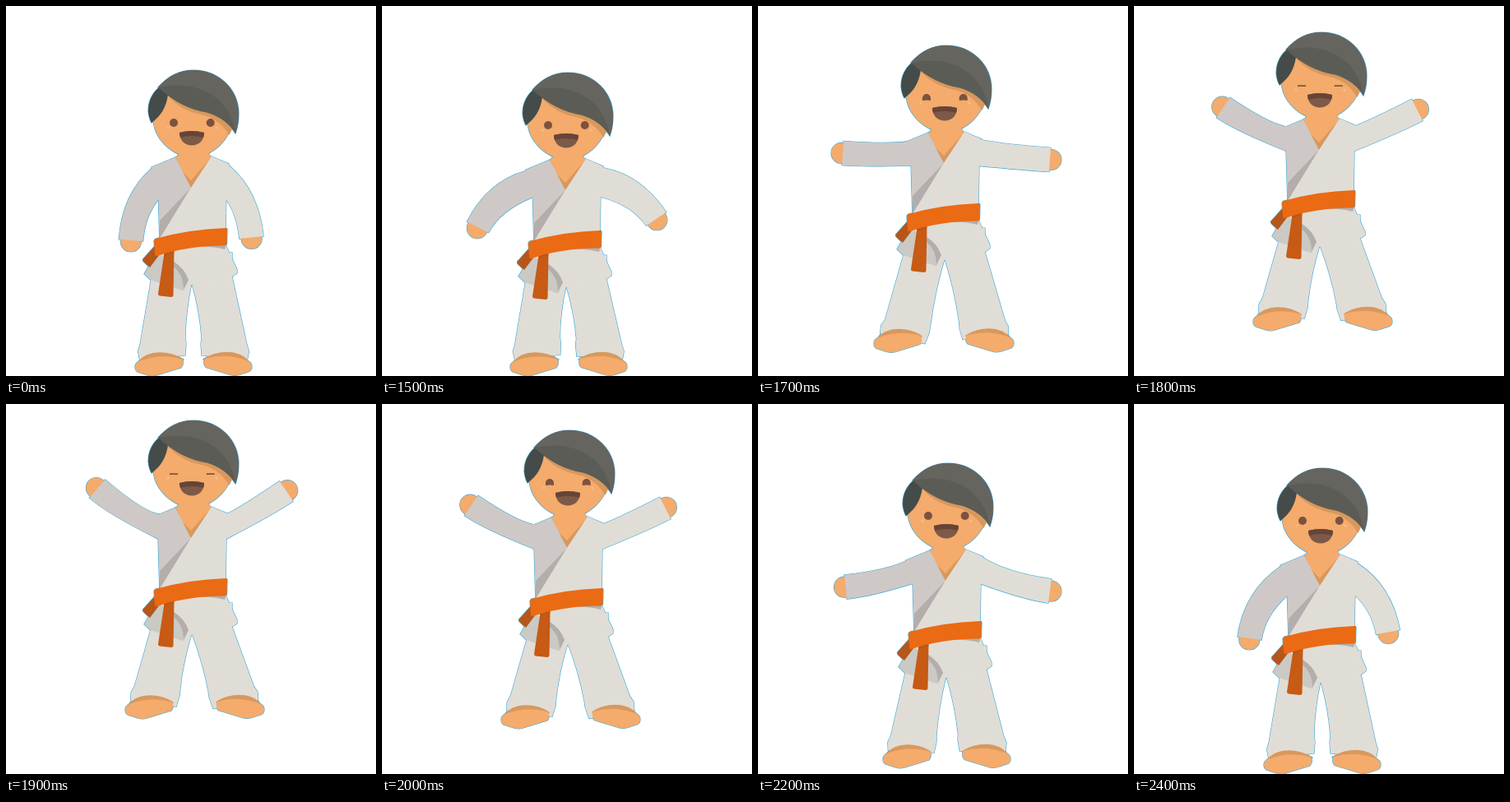
An HTML page with a canvas that plays this animation: 450x450 px, repeating every 2500 ms.

```html
<!DOCTYPE html>
<html lang="en">
<head>
<meta charset="utf-8">
<title>Karate jump</title>
<style>
  html, body { margin: 0; width: 100%; height: 100%; overflow: hidden; background: #fff; }
  canvas { display: block; width: 450px; height: 450px; }
</style>
</head>
<body>
<canvas id="stage"></canvas>
<script>
const SIZE = 450, LOOP = 2500, REST = 1500, STEP = 100;
const canvas = document.getElementById('stage');
const ctx = canvas.getContext('2d');
const dpr = window.devicePixelRatio || 1;
canvas.width = canvas.height = SIZE * dpr;

const C = {
  edge: '#3ba8d8', skin: '#f4ab6c', skinDark: '#d8985d', blush: '#f8bb84',
  light: '#e0ddd6', shade: '#cec9c6', fold: '#b3aeac', flap: '#cbc9c4',
  belt: '#eb6a14', tail: '#c75a14', knot: '#b85518',
  hair: '#5b5c56', hairTop: '#66645f', hairBack: '#454b48',
  eye: '#7c523f', mouth: '#7d5a48', lip: '#664537'
};

// body offset | left cuff x, y, angle | right cuff x, y, angle | foot shifts, foot lift | eye
const OPEN = 0, HALF = 1, SHUT = 2;
const high = [0, -46, 108.5, 169.5, 214, 344.5, 172.5, -27, -12, 15, -55];
const poses = [
  [0, 0, 152, 285, 94, 298.5, 281.5, 84, 0, 0, 0, OPEN],
  [-2, 3, 118.5, 266, 117, 335.5, 256, 56, -1, -1, 0, OPEN],
  [0, -13, 108, 242, 150, 348, 237, 30, -8, 5, -14, OPEN],
  [1, -30, 102, 209, 184, 354, 217, 4, -16, 12, -28.5, HALF],
  [...high, SHUT],
  [0, -58, 111, 161, 221, 341, 164, -34, -12, 15, -67, SHUT],
  [...high, HALF],
  [1, -28, 102, 201, 190, 354, 206, -3, -11, 12, -32, OPEN],
  [3, -6, 103.5, 228.5, 174, 352, 233.5, 8, -5, 8, -7, OPEN],
  [2, -1, 110, 255, 140, 345, 250, 40, -1, 3, -1, OPEN],
  [1, 0, 139.5, 285, 98, 308, 277.5, 79, 1, 1, 0, OPEN]
];

let outlining = false;

// Outlined parts get their blue rim in the first pass, every part its fill in the second.
function part(color, d, rim) {
  const path = new Path2D(d);
  if (!outlining) {
    ctx.fillStyle = color;
    ctx.fill(path);
  } else if (rim) {
    ctx.strokeStyle = C.edge;
    ctx.lineWidth = 1.2;
    ctx.stroke(path);
  }
}

const disc = (x, y, r) => `M${x - r} ${y}a${r} ${r} 0 1 1 ${2 * r} 0a${r} ${r} 0 1 1 ${-2 * r} 0Z`;

function shifted(x, y, draw) {
  ctx.save();
  ctx.translate(x, y);
  draw();
  ctx.restore();
}

function leg(right, bx, by, fx, fy) {
  const side = right ? -1 : 1;
  const flip = x => right ? 456 - x : x;
  const turn = -(fx - bx) * side * 1.05 * Math.PI / 180;
  const cos = Math.cos(turn), sin = Math.sin(turn);
  const cuff = (x, y) => {
    const u = x - 173, v = y - 435;
    return [flip(173 + u * cos - v * sin) + fx, 435 + u * sin + v * cos + fy];
  };
  const inner = cuff(218, 404);
  const fork = [226 + bx, 337 + by];
  const bend = [(inner[0] + fork[0]) / 2 - 3.5 * side, (inner[1] + fork[1]) / 2];
  const hip = [(right ? 275 : 177) + bx, 329 + by];
  const outer = [[163, 412], [160.5, 420], [162.5, 430], [218, 425], [219, 411]].map(p => cuff(...p));
  part(C.light, `M${226 + bx} ${300 + by}L${hip[0]} ${300 + by}L${hip}L${outer.join('L')}L${inner}Q${bend} ${fork}Z`, true);
}

function foot(right, fx, fy) {
  shifted(fx, fy, () => {
    if (right) ctx.transform(-1, 0, 0, 1, 456, -0.5);
    part(C.skinDark, 'M160 434C168 420 195 416 216 430L212 436Z', true);
    part(C.skin, 'M157 439Q157 434 162 432Q188 422 214 429.5Q217 435 213 440L182 449.5Q178 450.5 172 449L160 445Q157 443 157 439Z', true);
  });
}

function arm(right, x, y, deg) {
  const a = deg * Math.PI / 180;
  const n = [Math.cos(a), Math.sin(a)];
  const half = right ? -14.8 : 14.8;
  const lift = Math.max(0, (right ? 84 - deg : deg - 94) / 120);
  const back = (p, k) => [p[0] - n[0] * k, p[1] - n[1] * k];
  const out = [x - n[1] * half, y + n[0] * half];
  const inn = [x + n[1] * half, y - n[0] * half];
  const shoulder = right
    ? [272 - 3 * lift, 194.5 - 3 * lift]
    : [177 + 7 * lift * lift, 197.5 - 5 * lift * lift];
  const pit = [right ? 268 : 185 - lift, 236 - 14 * Math.sqrt(lift)];
  const mid = right ? 255 : 200;
  part(C.skin, disc(x + n[0] * 1.5, y + n[1] * 1.5, 12.5), true);
  part(right ? C.light : C.shade,
    `M${shoulder}Q${back(out, 55)} ${out}L${inn}Q${back(inn, 30)} ${pit}L${mid} 230L${mid} 195Z`, true);
}

function skirt() {
  part(C.light, 'M184 290L267 290L281 320.5L281 325L275 329L226 339L200 332Z', true);
  part(C.fold, 'M232 293L268 289L266 296Q250 292 232 293Z');
  part(C.flap, 'M183 300L168 326L175.5 333L216 346.5L222 333Q216 318 204 311Z', true);
  part(C.fold, 'M204 311Q217 319 222 333L216 344Q216 327 204 317Z');
}

function torso() {
  part(C.shade, 'M206 184L177 196L185 222L187 290L226 285L226 220Z', true);
  part(C.light, 'M250 183L271 192L268 222L267 285L187 292L187 281L225 221Z', true);
}

function lapels() {
  part(C.skin, 'M211 174L245 174Q246 181 250 184L225 221L206 184Q211 182 211 174Z', true);
  part(C.skinDark, 'M215 202L225 212L248 186L225 221Z');
  part(C.fold, 'M225 221L187 261L187 283Z');
  part(C.light, 'M250 183L268 191L260 225L240 240L187 283L225 221Z');
}

function belt() {
  part(C.knot, 'M180 293L166.5 308Q166 310 168 311.5L175 318L187 302Z', true);
  part(C.tail, 'M193 297L204.5 297L203.5 352Q203 354 201 354L187 352.5Q185 352 185 350Z', true);
  part(C.knot, 'M192.5 299L204.5 296L204.3 300Q198 301 192.3 304Z');
  part(C.belt, 'M180 286Q180 284 182 283Q222 271.5 267 270Q269 270 269 272L268.5 289.5Q268 291.5 266 291.5Q220 291.5 184 304Q181 304.5 181 302Z', true);
}

function eye(x, state) {
  if (state === SHUT) return part(C.eye, `M${x - 5} 142.2h10v1.7h-10Z`);
  if (state === HALF) return part(C.eye, `M${x - 5} 145V142a5 5 0 0 1 10 0V145Q${x} 143.8 ${x - 5} 145Z`);
  part(C.eye, disc(x, 142, 5));
}

function head(state) {
  part(C.skin, 'M179 136C179 100 200 90 227 90C256 90 275 110 275 136C275 162 251 183.5 227 183.5C203 183.5 179 162 179 136Z', true);
  part(C.skinDark, 'M196 108Q211 127 240 132.5Q260 138 271.5 157L276 148L262 126L210 106Z');
  part(C.hairBack, 'M190 96Q173 108 173 128Q174 137 177 142Q194 130 197 108Z', true);
  part(C.hair, 'M185 99C198 84 212 78 228 78C260 78 283 103 283 131Q283 144 279 155Q268 137 245 129.7Q213 125 185 99Z', true);
  part(C.hairTop, 'M185 99C198 84 212 78 228 78C260 78 283 103 283 131Q283 144 279 155C273 114 238 88 185 99Z');
  part(C.blush, disc(197, 148, 1.8));
  part(C.blush, disc(256, 148, 1.8));
  eye(204, state);
  eye(248.7, state);
  part(C.mouth, 'M211 154Q226 150 241 154C241 163 235 169.5 226 169.5C217 169.5 211 163 211 154Z');
  part(C.lip, 'M211 154Q226 150 241 154Q241 157 240 160Q226 156 212 160Q211 157 211 154Z');
}

function figure([bx, by, lx, ly, la, rx, ry, ra, fl, fr, fy, state]) {
  leg(false, bx, by, fl, fy);
  leg(true, bx, by, fr, fy);
  foot(false, fl, fy);
  foot(true, fr, fy);
  shifted(bx, by, () => {
    skirt();
    torso();
    arm(false, lx, ly, la);
    arm(true, rx, ry, ra);
    lapels();
    belt();
    head(state);
  });
}

function frame() {
  const t = performance.now() % LOOP;
  const i = t < REST ? 0 : 1 + Math.floor((t - REST) / STEP);
  ctx.setTransform(dpr, 0, 0, dpr, 0, 0);
  ctx.fillStyle = '#fff';
  ctx.fillRect(0, 0, SIZE, SIZE);
  for (outlining of [true, false]) figure(poses[i]);
  requestAnimationFrame(frame);
}
frame();
</script>
</body>
</html>
```
